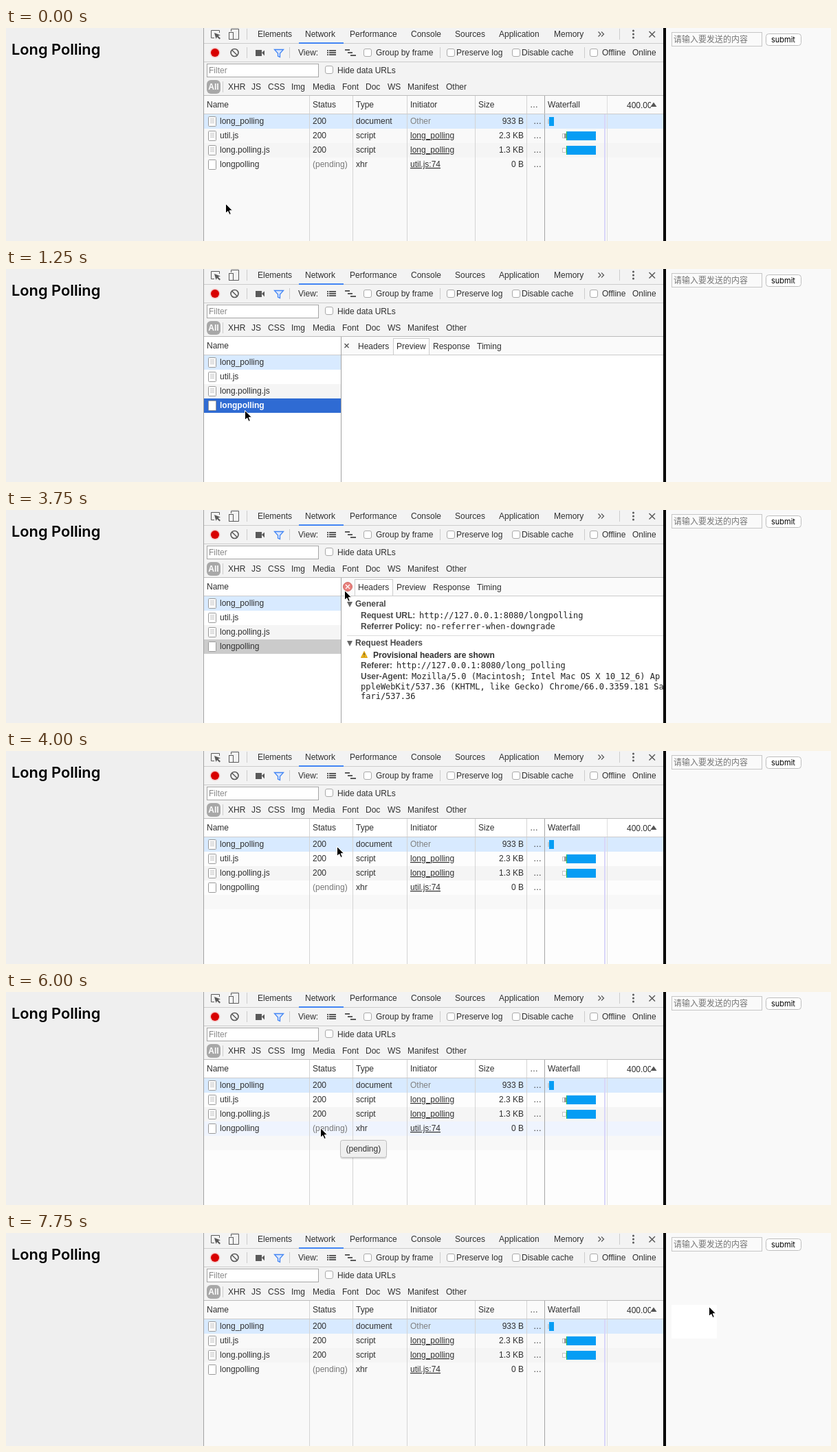
An HTML page for the animation above (8 s loop, 1200 by 311 pixels).

```html
<!DOCTYPE html>
<html lang="en">
<head>
<meta charset="utf-8">
<title>Long Polling</title>
<style>
  html, body { margin: 0; width: 100%; height: 100%; overflow: hidden; background: #f9f9f9; }
  svg { display: block; }
  text { font: 12px "Liberation Sans", Arial, sans-serif; fill: #303030; white-space: pre; }
  .bold { font-weight: bold; }
  .mono { font-family: "DejaVu Sans Mono", monospace; fill: #222; }
  .title { font: 600 21.8px Inter, sans-serif; fill: #000; }
  .button { font: 11px Inter, sans-serif; fill: #000; }
  .hint { font: 12px "Noto Sans CJK SC", "Noto Sans CJK", sans-serif; fill: #757575; }
  .link { text-decoration: underline; }
</style>
</head>
<body>
<svg width="1200" height="311" viewBox="0 0 1200 311">
  <g id="chrome"></g>
  <g id="stage"></g>
</svg>
<script>
const STEP = 250, LOOP = 8000;
const ROW_TOP = 126, ROW_HEIGHT = 21;

const rect = (x, y, w, h, fill, extra = '') =>
  `<rect x="${x}" y="${y}" width="${w}" height="${h}" fill="${fill}" ${extra}/>`;
const box = (x, y, w, h, fill, stroke, r = 0) =>
  rect(x + .5, y + .5, w - 1, h - 1, fill, `stroke="${stroke}" rx="${r}"`);
const path = (d, stroke, fill = 'none', width = 1) =>
  `<path d="${d}" stroke="${stroke}" fill="${fill}" stroke-width="${width}"/>`;
const text = (x, y, str, cls = '', fill = '', anchor = 'start') =>
  `<text x="${x}" y="${y}" class="${cls}" text-anchor="${anchor}" ${fill && `style="fill:${fill}"`}>${str}</text>`;
const vline = (x, y, h, color = '#ccc') => rect(x, y, 1, h, color);
const hline = (x, y, w, color = '#ccc') => rect(x, y, w, 1, color);
const labels = (y, list) => list.map(([x, str]) => text(x, y, str)).join('');
const checkbox = (x, y) => box(x, y, 12, 12, '#fff', '#aaa', 2.5);

function pages() {
  return rect(0, 0, 287, 311, '#efefef') + text(8, 39, 'Long Polling', 'title') +
    rect(956, 0, 4, 311, '#000') + rect(960, 0, 240, 311, '#f9f9f9') +
    box(968, 6, 132, 21, '#fafafa', '#c6c6c6') + text(971, 21, '请输入要发送的内容', 'hint') +
    box(1105, 8, 52, 18, '#fff', '#bdbdbd', 4) + text(1113, 21, 'submit', 'button');
}

function tabBar() {
  const ink = '#5a5a5a';
  return rect(288, 0, 668, 98, '#f3f3f3') + hline(288, 22, 668) +
    path('M303 14.5H298.5V3.5H310.5V7', ink) +
    path('M303 7L312 10.5L308.5 11.5L312 15L310.5 16.5L307 13L305.5 16Z', 'none', ink) +
    path('M327.5 5V1.5H338.5V16.5H331', ink) + box(324, 6, 7, 11, '#f3f3f3', ink) +
    vline(350, 1, 16) + vline(892, 1, 16) +
    labels(13, [[366, 'Elements'], [435, 'Network'], [500, 'Performance'], [589, 'Console'],
      [653, 'Sources'], [717, 'Application'], [797, 'Memory']]) +
    rect(426, 21, 65, 2, '#4285f4') +
    path('M861.5 5.5L865 9L861.5 12.5M866 5.5L869.5 9L866 12.5', ink, 'none', 1.3) +
    [4, 9, 14].map(y => `<circle cx="912.5" cy="${y}" r="1.5" fill="${ink}"/>`).join('') +
    path('M935.5 5L944 13.5M944 5L935.5 13.5', ink, 'none', 1.5);
}

function toolbar() {
  const ink = '#5a5a5a';
  const bars = [32, 35, 38].map(y => rect(467, y, 2, 2, ink) + rect(470, y, 10, 2, ink)).join('');
  return `<circle cx="304" cy="36" r="7.5" fill="#f5caca"/><circle cx="304" cy="36" r="6" fill="#d80000"/>` +
    `<circle cx="332.500" cy="36" r="5.500" fill="none" stroke="${ink}" stroke-width="1.6"/>` +
    path('M328.5 32L336.500 40', ink, 'none', 1.5) +
    rect(363, 32, 9, 9, ink) + path('M372 36L376 32.500V40.500Z', 'none', ink) +
    path('M390.500 31.500H403.500L398.500 37V42.500L395.500 41V37Z', '#4285f4', '#dce8fd', 1.3) +
    [350, 412, 631, 841].map(x => vline(x, 28, 16)).join('') + bars +
    rect(493, 31, 7, 2, ink) + rect(497, 35, 7, 2, ink) + rect(501, 39, 8, 2, ink) +
    [520, 641, 736, 849].map(x => checkbox(x, 30)).join('') +
    labels(40, [[425, 'View:'], [538, 'Group by frame'], [655, 'Preserve log'],
      [750, 'Disable cache'], [867, 'Offline'], [911, 'Online']]) +
    hline(288, 49, 668) + box(292, 52, 163, 20, '#fff', '#a6a6a6') +
    text(295, 66, 'Filter', '', '#888') + checkbox(464, 55) + text(482, 66, 'Hide data URLs') +
    rect(292, 76, 20, 20, '#a8a8a8', 'rx="6"') + text(302, 90, 'All', 'bold', '#fff', 'middle') +
    vline(315, 78, 16) +
    labels(90, [[323, 'XHR'], [357, 'JS'], [381, 'CSS'], [415, 'Img'], [446, 'Media'], [489, 'Font'],
      [523, 'Doc'], [555, 'WS'], [584, 'Manifest'], [640, 'Other']]) +
    hline(288, 98, 668, '#bbb') + vline(287, 0, 311, '#a3a3a3');
}

const requests = [
  ['long_polling', '200', 'document', 'Other', '933 B'],
  ['util.js', '200', 'script', 'long_polling', '2.3 KB'],
  ['long.polling.js', '200', 'script', 'long_polling', '1.3 KB'],
  ['longpolling', '(pending)', 'xhr', 'util.js:74', '0 B'],
];
const rowY = i => ROW_TOP + i * ROW_HEIGHT;

function nameCell(i, selected) {
  const y = rowY(i);
  const lines = [5, 7, 9, 11].map(d => hline(297, y + d + 1, 6, '#c8c8c8')).join('');
  return box(294, y + 3, 12, 15, '#fff', '#999', 1) + (i < 3 ? lines : '') +
    text(311, y + 14, requests[i][0], selected ? 'bold' : '', selected && '#fff');
}

function table(cursor, repainted) {
  const paper = repainted ? '#fdfdfd' : '#f9f9f9';
  const inside = cursor.x > 288 && cursor.x < 956;
  const hovered = inside ? Math.floor((cursor.y - ROW_TOP) / ROW_HEIGHT) : -1;
  let out = rect(288, 99, 668, 212, paper) + rect(288, 99, 668, 26, repainted ? '#fff' : '#fafafa');
  if (repainted) out += rect(288, rowY(4), 668, ROW_HEIGHT, '#f8f8f8');
  requests.forEach((r, i) => {
    const fill = i === 0 ? '#d8eaff' : i === hovered ? '#eff4fe' : i === 2 ? '#f5f5f5' : paper;
    out += rect(288, rowY(i), 668, ROW_HEIGHT, fill);
  });
  out += [441, 504, 583, 682, 757].map(x => vline(x, 99, 212, '#d4d4d4')).join('') +
    vline(783, 99, 212, '#a6a6a6') + vline(874, 99, 212, '#dedede') +
    rect(870, 126, 2, 185, '#d9d6f8') + hline(288, 125, 668);
  out += labels(116, [[292, 'Name'], [446, 'Status'], [509, 'Type'], [588, 'Initiator'], [687, 'Size'],
    [762, '…'], [788, 'Waterfall']]) +
    `<svg x="900" y="99" width="38" height="26">${text(3, 18, '400.00')}</svg>` +
    path('M937.500 115L942 108.500L946.500 115Z', 'none', '#555');
  requests.forEach(([, status, type, initiator, size], i) => {
    const base = rowY(i) + 14, top = rowY(i) + 4;
    out += nameCell(i) + text(446, base, status, '', i === 3 && '#777') + text(509, base, type) +
      text(588, base, initiator, i ? 'link' : '', !i && '#808080') +
      text(753, base, size, '', '', 'end') + text(767, base, '…');
    if (i === 0) out += rect(788, top + 3, 2, 7, '#ccc') + rect(790, top, 7, 13, '#069df4');
    if (i === 1 || i === 2) {
      out += box(809, top + 3, 6, 7, '#fff', '#c4c4c4') + (i === 1 ? rect(812, top + 3, 3, 7, '#999') : '') +
        rect(815, top, 1, 13, '#1fbf4f') + rect(816, top, 42, 13, '#069df4');
    }
  });
  return out;
}

function headersView() {
  const ink = '#484848';
  const pair = (y, key, x, value) => text(516, y, key, 'bold', ink) + text(x, y, value, 'mono');
  const section = (y, name) =>
    path(`M496 ${y - 7}H504L500 ${y + 1}Z`, 'none', '#666') + text(508, y, name, 'bold', ink);
  return section(141, 'General') +
    pair(158, 'Request URL:', 601, 'http://127.0.0.1:8080/longpolling') +
    pair(174, 'Referrer Policy:', 611, 'no-referrer-when-downgrade') +
    hline(496, 183, 460, '#dcdcdc') + section(198, 'Request Headers') +
    path('M521 206.500L525.500 215.500H516.500Z', '#d9a010', '#f2b81c') + rect(520.5, 209, 1, 3, '#333') +
    rect(520.5, 213, 1, 1, '#333') +
    text(534, 216, 'Provisional headers are shown', 'bold') +
    pair(231, 'Referer:', 568, 'http://127.0.0.1:8080/long_polling') +
    pair(247, 'User-Agent:', 590, 'Mozilla/5.0 (Macintosh; Intel Mac OS X 10_12_6) Ap') +
    text(516, 262, 'ppleWebKit/537.36 (KHTML, like Gecko) Chrome/66.0.3359.181 Sa', 'mono') +
    text(516, 276, 'fari/537.36', 'mono');
}

function details(cursor, showHeaders) {
  const onBar = cursor.y > 101 && cursor.y < 125;
  const overTab = onBar && cursor.x > 507 && cursor.x < 562;
  const overClose = onBar && cursor.x > 488 && cursor.x < 504;
  let out = rect(288, 99, 668, 212, '#fff') + rect(488, 99, 468, 26, '#fafafa') +
    rect(288, rowY(0), 199, ROW_HEIGHT, '#d8eaff') + rect(288, rowY(2), 199, ROW_HEIGHT, '#f5f5f5') +
    rect(288, rowY(3), 199, ROW_HEIGHT, showHeaders ? '#cbcbcb' : '#2f6bd3') +
    hline(288, 125, 668) + vline(487, 99, 212, '#a3a3a3') + text(292, 116, 'Name');
  requests.forEach((_, i) => out += nameCell(i, i === 3 && !showHeaders));
  if (showHeaders || overTab) out += box(507, 101, 56, 25, overTab ? '#e0e0e0' : '#fff', '#ccc');
  if (!showHeaders) out += box(563, 101, 53, 25, '#fff', '#ccc');
  if (overClose) out += '<circle cx="497" cy="112" r="6.500" fill="#e8807c" stroke="#cf6a66"/>';
  const cx = overClose ? 497 : 495.5;
  out += path(`M${cx - 3} 109L${cx + 3} 115M${cx + 3} 109L${cx - 3} 115`, overClose ? '#fff' : '#555', 'none', 1.3);
  out += labels(117, [[512, 'Headers'], [568, 'Preview'], [621, 'Response'], [685, 'Timing']]);
  return out + (showHeaders ? headersView() : '');
}

const tooltip = (x, y) => rect(x, y + 2, 68, 26, '#000', 'rx="4" opacity=".12"') +
  box(x, y, 68, 26, '#efefef', '#bdbdbd', 3) + text(x + 8.500, y + 17, '(pending)');

const pointer = ({ x, y }) =>
  `<g transform="translate(${x} ${y})">` +
  path('M.5 .5V14.500L3.800 11.500L6 16.500L8.300 15.500L6.200 10.700H10.500Z', '#fff', '#000') + '</g>';

// Pointer route: step, x, y
const route = [
  [1, 319, 256], [4, 347, 206], [5, 347, 206], [9, 523, 113], [10, 523, 113], [15, 492, 117],
  [19, 447, 203], [20, 447, 203], [24, 457, 198], [27, 457, 198], [30, 969, 136], [31, 1022, 107],
];
function pointerAt(step) {
  const next = route.findIndex(p => p[0] >= step);
  if (next === 0) return { x: route[0][1], y: route[0][2] };
  const [s0, x0, y0] = route[next - 1], [s1, x1, y1] = route[next];
  const k = (step - s0) / (s1 - s0);
  return { x: Math.round(x0 + (x1 - x0) * k), y: Math.round(y0 + (y1 - y0) * k) };
}

function scene(step) {
  const between = (a, b) => step >= a && step <= b;
  const cursor = pointerAt(step);
  let out = between(4, 15) ? details(cursor, step >= 9) : table(cursor, between(16, 27));
  if (between(19, 20)) out += tooltip(468, 199);
  if (between(23, 27)) out += tooltip(486, 216);
  if (step === 31) out += rect(968, 105, 66, 49, '#fff');
  return out + pointer(cursor);
}

const stage = document.getElementById('stage');
document.getElementById('chrome').innerHTML = pages() + tabBar() + toolbar();
let shown = -1;
function tick() {
  const step = Math.floor(performance.now() % LOOP / STEP);
  if (step !== shown) stage.innerHTML = scene(shown = step);
  requestAnimationFrame(tick);
}
tick();
</script>
</body>
</html>
```
